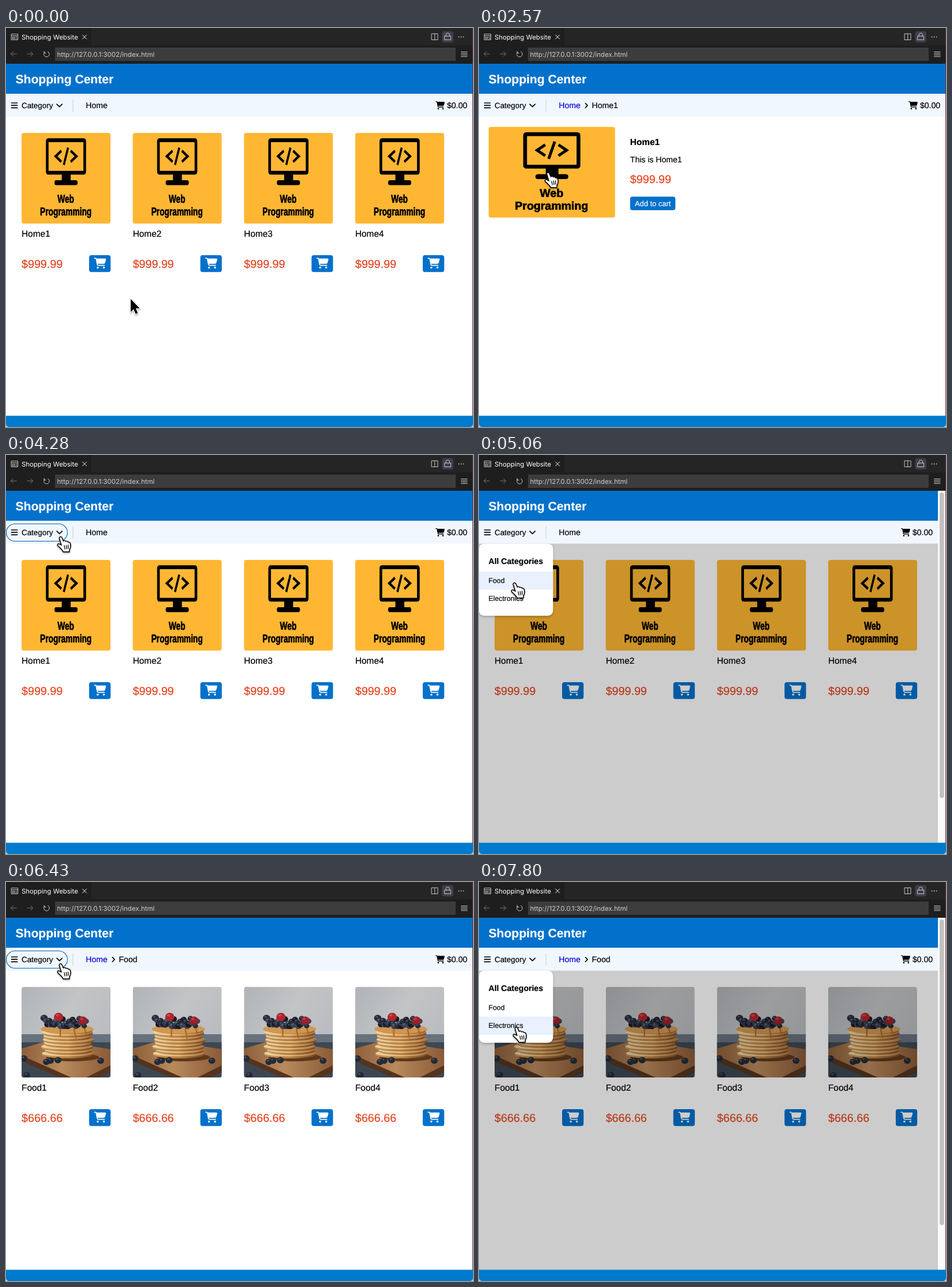
An HTML page for the animation above (8 s loop, 809 px wide and 692 px high).

```html
<!DOCTYPE html>
<html lang="en">
<head>
<meta charset="utf-8">
<title>Shopping Website</title>
<style>
  html, body { margin: 0; width: 100%; height: 100%; overflow: hidden; background: #fff; }
  svg { display: block; font-family: "Liberation Sans", Arial, sans-serif; text-rendering: geometricPrecision; }
  text { fill: currentColor; stroke: currentColor; stroke-width: .2; }
  .ui { font-family: Inter, Roboto, sans-serif; stroke: none; }
  .line { fill: none; stroke-linecap: round; stroke-linejoin: round; }
  .bold { font-weight: bold; }
  .heavy text { stroke-width: .7; }
</style>
</head>
<body>
<svg id="stage" width="809" height="692" viewBox="0 0 809 692" color="#000">
  <defs>
    <clipPath id="thumb"><rect width="154" height="157" rx="4"/></clipPath>
    <linearGradient id="wall" x2="1" y2=".6">
      <stop stop-color="#b0b3b7"/><stop offset=".5" stop-color="#c2c4c6"/><stop offset="1" stop-color="#b9bbbe"/>
    </linearGradient>
    <linearGradient id="board"><stop stop-color="#8d5f3a"/><stop offset=".45" stop-color="#b98a5c"/><stop offset="1" stop-color="#8a5b37"/></linearGradient>
    <linearGradient id="crust"><stop stop-color="#c49458"/><stop offset=".5" stop-color="#b9803f"/><stop offset="1" stop-color="#79481f"/></linearGradient>
    <linearGradient id="crumbs"><stop stop-color="#ecd3a6"/><stop offset=".5" stop-color="#e3bd83"/><stop offset="1" stop-color="#a97440"/></linearGradient>
    <filter id="soft" x="-30%" y="-30%" width="160%" height="170%">
      <feDropShadow dx="0" dy="1.5" stdDeviation="1.3" flood-opacity=".45"/>
    </filter>
    <filter id="menuShadow" x="-20%" y="-20%" width="140%" height="140%">
      <feDropShadow dx="0" dy="2" stdDeviation="2.2" flood-opacity=".25"/>
    </filter>
    <g id="cart">
      <path d="M112 32H531q46 0 38 50l-41 152q-14 54-70 54H160z"/>
      <path class="line" stroke="currentColor" stroke-width="48" d="M24 24H70q26 0 32 26l50 262q8 48 48 48H488"/>
      <circle cx="176" cy="464" r="48"/><circle cx="464" cy="464" r="48"/>
    </g>
    <g id="poster">
      <rect x="63.2" y="12.6" width="92.4" height="56.4" rx="2" fill="none" stroke="#000" stroke-width="6.6"/>
      <path d="M99 70h22v12h13q4 0 4 4.3t-4 4.3h-49q-4 0-4-4.3t4-4.3h14z"/>
      <path fill="none" stroke="#000" stroke-width="5" d="M98 31L84 40.5L98 50M114.5 25.5L104 55.5M121 31L135 40.5L121 50"/>
      <g class="bold heavy" font-size="19.5" text-anchor="middle">
        <text x="109" y="121">Web</text><text x="109" y="143">Programming</text>
      </g>
    </g>
    <g id="pancakes" clip-path="url(#thumb)"></g>
  </defs>

  <rect width="809" height="692" fill="#d5d8da"/>
  <rect y="62" width="809" height="612" fill="#fff"/>

  <!-- editor chrome -->
  <rect width="809" height="30" fill="#252526"/>
  <path d="M0 0H148V30H809V62H0z" fill="#1e1e1e"/>
  <rect x="85" y="34" width="694" height="23" fill="#3c3c3c"/>
  <rect x="755.5" y="5.5" width="19.5" height="19.5" rx="4" fill="#403e4b"/>
  <g class="line" stroke="#c8c8c8">
    <path d="M9.5 10.5h11v10h-11zM9.5 13.5h11M11.5 16h3.5v2.5h-3.5zM17 16h2M17 18.5h2"/>
    <path d="M737.5 10h10.5v10.5h-10.5zM742.75 10v10.5"/>
    <path d="M760 14h10.5v6.5h-10.5zM762 14v-2a3.2 3.2 0 0 1 6.4 0v2"/>
    <path d="M788.5 41.5h10.5M788.5 44.2h10.5M788.5 46.9h10.5M788.5 49.6h10.5"/>
    <path d="M67 41.8a4.8 4.8 0 1 0 5.5-.8M66 40.5v3h3"/>
    <path stroke="#fff" d="M132.5 12l7 7M139.5 12l-7 7"/>
    <path stroke="#777" d="M18 45H8.5M12.5 41L8.5 45L12.5 49M37 45H46.5M42.5 41L46.5 45L42.5 49"/>
  </g>
  <g fill="#ccc"><circle cx="784.5" cy="15.5" r=".9"/><circle cx="788.5" cy="15.5" r=".9"/><circle cx="792.5" cy="15.5" r=".9"/></g>
  <text class="ui" x="27" y="20" font-size="11.4" color="#fff">Shopping Website</text>
  <text class="ui" x="88.5" y="50" font-size="11.5" color="#d0d0d0">http://127.0.0.1:3002/index.html</text>

  <!-- page header -->
  <rect y="62" width="808" height="52" fill="#0271cb"/>
  <text class="bold" x="16.5" y="96" font-size="21.07" color="#fff">Shopping Center</text>
  <rect y="114" width="808" height="39.7" fill="#f0f7ff"/>
  <rect id="pill" x=".5" y="119.5" width="106" height="30" rx="15" fill="none" stroke="#0062b3" stroke-width="1.1"/>
  <path class="line" stroke="#000" stroke-width="1.7" d="M9.5 130h10M9.5 134.2h10M9.5 138.4h10M88 132.2l4.6 4.5l4.6-4.5"/>
  <text x="27" y="139" font-size="13.4">Category</text>
  <path d="M116 124V145" stroke="#ccc"/>
  <text id="home" x="138.3" y="139" font-size="14.05">Home</text>
  <g id="trail">
    <path class="line" stroke="#000" stroke-width="1.6" d="M184.3 130.5l3.7 3.9l-3.7 3.9"/>
    <text id="crumb" x="195.5" y="139" font-size="14.05"></text>
  </g>
  <g id="total">
    <use href="#cart" transform="translate(744 127) scale(.0278)"/>
    <text x="764" y="139" font-size="14.05">$0.00</text>
  </g>

  <g id="list"></g>
  <rect id="outline" x="17.4" y="172.4" width="173.4" height="260.4" rx="9" fill="none" stroke="#e80c0c" stroke-width="1.7"/>

  <g id="detail">
    <rect x="16.7" y="171.5" width="219" height="157.3" rx="4" fill="#ffb733"/>
    <use href="#poster" x="16.7" y="171.5"/>
    <text class="bold" x="261.8" y="203" font-size="15.4">Home1</text>
    <text x="261.8" y="233" font-size="14.05">This is Home1</text>
    <text x="261.8" y="268.5" font-size="19.7" color="#e6431f">$999.99</text>
    <rect x="261.8" y="292.5" width="78.4" height="23.5" rx="4" fill="#0271cb"/>
    <text x="270" y="308.5" font-size="12.9" color="#fff">Add to cart</text>
  </g>

  <g id="menu">
    <rect y="153.7" width="795" height="519.3" opacity=".2"/>
    <rect x="795" y="62" width="13" height="611" fill="#fafafa"/>
    <rect x="798" y="65" width="7.5" height="530" rx="3.75" fill="#c1c1c1"/>
    <rect y="153.7" width="128.2" height="125" rx="9" fill="#fff" filter="url(#menuShadow)"/>
    <rect id="row" width="128.2" height="31.5" fill="#e8f1fd"/>
    <text class="bold" x="16.5" y="189.3" font-size="14.05">All Categories</text>
    <text x="16.5" y="221.5" font-size="12.3">Food</text>
    <text x="16.5" y="253" font-size="12.3">Electronics</text>
  </g>

  <path d="M0 672.6H809V686q0 6-6 6H6q-6 0-6-6z" fill="#007acc"/>
  <path d="M808.5 0V673" stroke="#6e2b2f"/>

  <g id="pointer" filter="url(#soft)">
    <path id="arrow" d="M0 0V22.5L5 17.8L8.7 26L12.4 24.4L8.8 16.3H15.7Z" stroke="#fff" stroke-width="2.2" paint-order="stroke"/>
    <g id="hand" class="line" transform="translate(-7 -1)" stroke="#000" stroke-width="1.5">
      <path fill="#fff" d="M5.2 4C5.6 1.4 8.6 .9 9.8 3.3L12.4 9.2C13.8 7.8 16 8.2 16.8 9.9C18.3 8.9 20.3 9.6 20.8 11.3C22.6 10.7 24.1 11.8 24.5 13.6C25.5 18 25 21.3 22.9 24V28H12.2C11 25 8 22 3.4 18C1 15.7 2.9 13 5.6 14.3L9 16.4Z"/>
      <path stroke-width="1.3" d="M13.9 17l1.1 6M17.3 16.6l.7 6M20.5 16.2l.3 6"/>
    </g>
  </g>
</svg>

<script>
const $ = id => document.getElementById(id);
const show = (id, on) => { $(id).style.display = on ? '' : 'none'; };

function pancakes() {
  let seed = 7;
  const rand = () => (seed = seed * 16807 % 2147483647) / 2147483647;
  const oval = (x, y, rx, ry, fill) => `<ellipse cx="${x}" cy="${y}" rx="${rx}" ry="${ry}" fill="${fill}"/>`;
  const berry = (x, y, r, fill) => oval(x, y, r, r * .9, fill) + oval(x - r * .25, y - r * .35, r * .35, r * .25, '#ffffff30');
  let s = `<rect width="154" height="157" fill="url(#wall)"/>
    <rect y="82" width="154" height="75" fill="#66727e"/>
    <path d="M0 96H154V157H0z" fill="#3d4752"/>
    <path d="M0 107L50 92L154 108V146L132 157H84L0 120z" fill="url(#board)"/>
    <path d="M0 119L86 157H66L0 129zM154 136V148L134 157H112z" fill="#54341f"/>` +
    oval(88, 122, 46, 7, '#5d381c');
  for (let i = 0; i < 8; i++) {
    const y = 117 - i * 6, x = 80 + 1.5 * Math.sin(i * 2), w = 43 + 2 * Math.cos(i * 3);
    s += oval(x, y, w, 7, 'url(#crust)') + oval(x, y - 2, w, 5.5, 'url(#crumbs)');
  }
  s += oval(79, 73, 46, 8, '#cf9752') +
    '<path class="line" stroke="#b5651d" stroke-width="2.5" d="M67 74v11M91 74l3 14M109 73l3 8"/>';
  for (let i = 0; i < 26; i++) {
    s += berry(39 + i * 2.9, 54 + rand() * 15, 4.5 + rand() * 2, ['#252a3b', '#3a4259', '#191a23'][i % 3]);
  }
  s += berry(64, 52, 8, '#b3242b') + berry(106, 58, 7.5, '#9f2029');
  for (const [x, y] of [[50, 128], [63, 127], [43, 130], [9, 153], [4, 124], [137, 128]]) s += berry(x, y, 6, '#222a38');
  return s;
}
$('pancakes').innerHTML = pancakes();

function cards(name, price, art) {
  return [0, 1, 2, 3].map(i => `<g transform="translate(${27 + i * 192.65} 0)">
    <g transform="translate(0 182)">${art}</g>
    <text y="362.3" font-size="15.4">${name}${i + 1}</text>
    <text y="415.5" font-size="19.7" color="#e6431f">${price}</text>
    <rect x="117" y="394" width="37.2" height="29.3" rx="4" fill="#0271cb"/>
    <use href="#cart" transform="translate(125.5 398.5) scale(.0365)" fill="#fff" color="#fff"/></g>`).join('');
}
const lists = {
  Home: cards('Home', '$999.99', `<rect width="154" height="157.3" rx="4" fill="#ffb733"/>
    <use href="#poster" transform="scale(.703 1)"/>`),
  Food: cards('Food', '$666.66', '<use href="#pancakes"/>')
};

// time, page, menu open
const scenes = [
  [0, 'Home', false], [1290, 'Detail', false], [3640, 'Home', false],
  [4460, 'Home', true], [5400, 'Food', false], [6820, 'Food', true]
];
// time, x, y of the pointer tip
const track = [
  [0, 216, 470], [225, 216, 470], [980, 116, 251], [1929, 116, 251], [1930, 117, 251],
  [2540, 117, 251], [2940, 238, 180], [3340, 148, 128], [3990, 148, 128], [4280, 94, 141],
  [4450, 94, 141], [5060, 61, 221], [6040, 61, 221], [6430, 94, 141], [6990, 94, 141],
  [7500, 65, 249], [7670, 65, 249], [7800, 64, 251], [8000, 64, 251]
];

function pointerAt(t) {
  const i = track.findIndex(p => p[0] > t);
  const [t0, x0, y0] = track[i - 1], [t1, x1, y1] = track[i];
  const k = (t - t0) / (t1 - t0), e = k * k * (3 - 2 * k);
  return [x0 + (x1 - x0) * e, y0 + (y1 - y0) * e];
}

let shown = '';
function render(t) {
  const [, page, open] = scenes.findLast(s => s[0] <= t);
  const [x, y] = pointerAt(t);
  const within = (l, top, r, b) => x >= l && x < r && y >= top && y < b;
  const detail = page === 'Detail';

  if (page !== shown) {
    shown = page;
    $('list').innerHTML = lists[page] || '';
    $('crumb').textContent = detail ? 'Home1' : page;
    $('home').setAttribute('color', page === 'Home' ? '#000' : '#0b00d6');
    show('trail', page !== 'Home');
    show('detail', detail);
  }
  $('total').setAttribute('transform', `translate(${open ? -13 : 0} 0)`);
  show('menu', open);

  const onPill = within(0, 119, 107, 150);
  const onCard = !open && !detail && within(17, 172, 191, 433);
  const onRow = open && within(0, 202, 128, 265);
  const onLink = detail && within(138, 126, 176, 143);
  show('pill', onPill);
  show('outline', onCard);
  show('row', onRow);
  $('row').setAttribute('y', y < 233.5 ? 202 : 233.5);

  // the pointer keeps its shape after a page change until the mouse moves
  const stale = (t >= 1290 && t < 2610) || (t >= 3640 && t < 3730);
  const hand = onPill || onCard || onRow || onLink || stale;
  show('hand', hand);
  show('arrow', !hand);
  $('pointer').setAttribute('transform', `translate(${x} ${y})`);
}

const start = performance.now();
function tick(now) {
  render(Math.max(0, now - start) % 8000);
  requestAnimationFrame(tick);
}
render(0);
requestAnimationFrame(tick);
</script>
</body>
</html>
```
